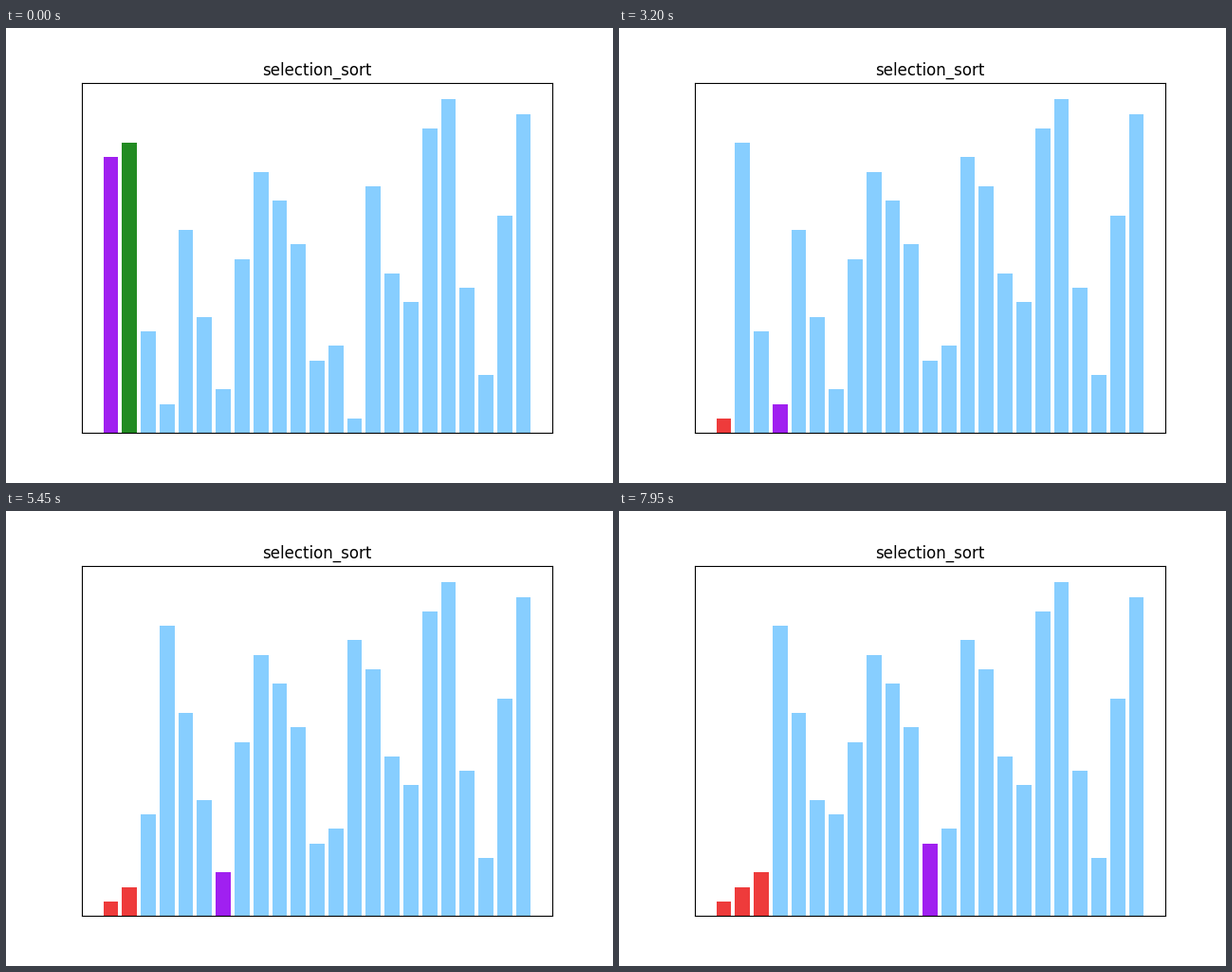
A matplotlib script for the animation above (8000 ms loop, 640 by 480 pixels).

```python
from itertools import islice

import matplotlib.pyplot as plt
from matplotlib.animation import FuncAnimation

PLAIN, SMALLEST, PROBE, SORTED = "#87CEFF", "#A020F0", "#228B22", "#EE3B3B"
VALUES = [19, 20, 7, 2, 14, 8, 3, 12, 18, 16, 13, 5,
          6, 1, 17, 11, 9, 21, 23, 10, 4, 15, 22]
FRAMES, INTERVAL = 160, 50


def selection_sort(values):
    """Yield the (value, colour) list after every visible step."""
    items = [[v, PLAIN] for v in values]
    n = len(items)

    def snap():
        return [tuple(item) for item in items]

    for i in range(n - 1):
        low = i
        items[low][1] = SMALLEST
        for j in range(i + 1, n):
            items[j][1] = PROBE
            yield snap()
            if items[j][0] < items[low][0]:
                items[low][1] = PLAIN
                yield snap()
                low = j
                items[low][1] = SMALLEST
            else:
                items[j][1] = PLAIN
            yield snap()
        items[i], items[low] = items[low], items[i]
        yield snap()
        items[i][1] = SORTED
        yield snap()


steps = list(islice(selection_sort(VALUES), FRAMES))

fig, ax = plt.subplots(figsize=(6.4, 4.8), dpi=100)
bars = ax.bar(range(len(VALUES)), VALUES, width=0.8, color=PLAIN)
ax.set_title("selection_sort")
ax.set_xticks([])
ax.set_yticks([])


def draw(k):
    for bar, (value, color) in zip(bars, steps[k]):
        bar.set_height(value)
        bar.set_facecolor(color)
    return list(bars)


anim = FuncAnimation(fig, draw, frames=FRAMES, interval=INTERVAL,
                     repeat=True, repeat_delay=0, blit=False)
plt.show()
```
